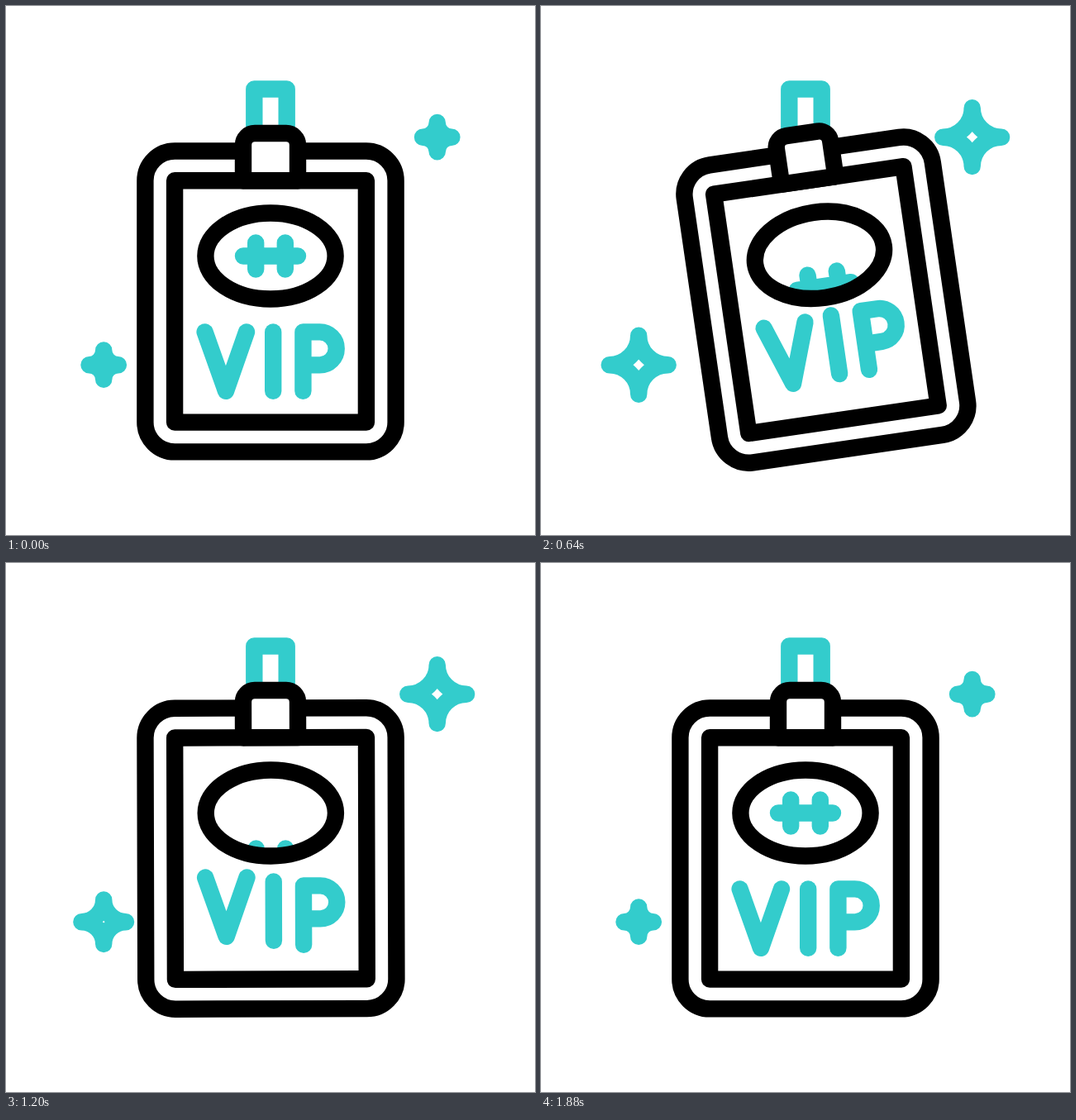
Write an HTML page that moves like this. It is 640x640 px and loops after 2 s.

```html
<!DOCTYPE html>
<html lang="en">
<head>
<meta charset="utf-8">
<title>VIP badge</title>
<style>
  html, body { margin: 0; width: 100%; height: 100%; overflow: hidden; background: #fff; }
  svg { display: block; width: 100%; height: 100%; }
  .ink { fill: none; stroke: #000; stroke-width: 20.4; stroke-linecap: round; stroke-linejoin: round; }
  .teal { stroke: #3cc; }
</style>
</head>
<body>
<svg viewBox="0 0 640 640" class="ink">
  <clipPath id="window"><ellipse cx="320" cy="302.5" rx="78.6" ry="52"/></clipPath>
  <g class="teal">
    <path id="sparkR" transform="translate(521.7 158.7)"/>
    <path id="sparkL" transform="translate(118.2 434.2)"/>
    <path d="M300.3 152V100.5H339.7V152" stroke-linecap="butt" style="stroke-linecap:butt"/>
  </g>
  <g id="card">
    <rect x="168.4" y="175.5" width="303.2" height="363.9" rx="35.8"/>
    <rect x="204.1" y="211.2" width="231.8" height="292.4"/>
    <path d="M287 211V168a14 14 0 0 1 14-14h38a14 14 0 0 1 14 14V211" fill="#fff"/>
    <path d="M287 211.2H353"/>
    <g clip-path="url(#window)">
      <path id="emblem" class="teal" d="M287 302.5H353M302.2 286.5v32M337.8 286.5v32"/>
    </g>
    <ellipse cx="320" cy="302.5" rx="78.6" ry="52"/>
    <g class="teal">
      <path id="V" d="M240.6 394.4L266 465.8 291 394.4"/>
      <path id="I" d="M323.2 394.4V465.8"/>
      <path id="P" d="M359.4 465.8V394.4H379.7a20 20 0 0 1 0 40H359.4"/>
    </g>
  </g>
</svg>
<script>
const STEP = 40, LOOP = 2000, LAST = 47;
const el = id => document.getElementById(id);

// Eased value at time n along [time, value] keys
function track(n, keys) {
  if (n <= keys[0][0]) return keys[0][1];
  for (let i = 1; i < keys.length; i++) {
    const [a, from] = keys[i - 1], [b, to] = keys[i];
    if (n < b) {
      const u = (n - a) / (b - a);
      return from + (to - from) * u * u * (3 - 2 * u);
    }
  }
  return keys[keys.length - 1][1];
}

// Keys ten steps apart
const beats = (start, values) => values.map((v, i) => [start + 10 * i, v]);
const pulse = (n, start, low, high) => track(n, beats(start, [low, high, low, high, low]));

function star(r) {
  const arc = (x, y) => `A${r} ${r} 0 0 0 ${x} ${y}`;
  return `M0 ${-r}` + arc(r, 0) + arc(0, r) + arc(-r, 0) + arc(0, -r) + 'Z';
}

const swing = beats(5, [0, -8.7, 5.5, -5.8, 0]);
// The emblem leaves at the top and comes back from below
const scroll = [[3, 0], [8, -100], [8, 100], [13.1, 100], [18.1, 0], [23, -100],
  [23, 100], [27.8, 100], [32.8, 0]];

const shiftY = (id, y) => el(id).setAttribute('transform', `translate(0 ${y})`);

function draw(now) {
  const n = Math.min(LAST, Math.floor(now % LOOP / STEP));
  el('sparkR').setAttribute('d', star(pulse(n, 3, 17.7, 40.3)));
  el('sparkL').setAttribute('d', star(pulse(n, 5, 17.7, 36)));
  el('card').setAttribute('transform', `rotate(${track(n, swing)} 320 185)`);
  shiftY('emblem', track(n, scroll));
  ['V', 'I', 'P'].forEach((id, i) => shiftY(id, pulse(n, 3 + 2 * i, 0, -18)));
  requestAnimationFrame(draw);
}
draw(0);
</script>
</body>
</html>
```
